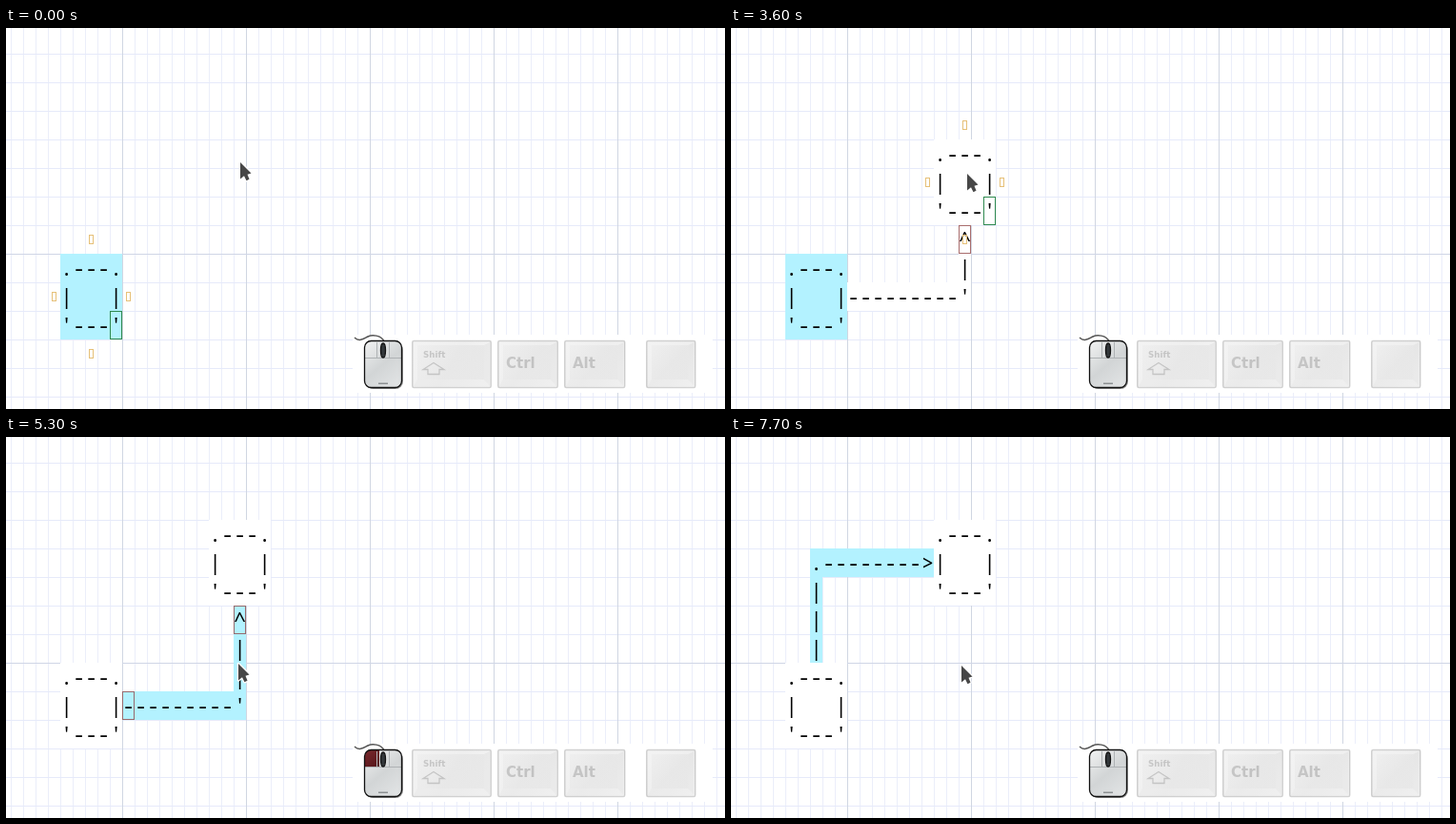
Animation, 755 px wide and 400 px high, one loop 8000 ms. Source, as an HTML page with a canvas:

```html
<!DOCTYPE html>
<html lang="en">
<head>
<meta charset="utf-8">
<title>Connected ASCII boxes</title>
<style>
html, body { margin: 0; width: 100%; height: 100%; overflow: hidden; background: #fff; }
canvas { display: block; }
</style>
</head>
<body>
<canvas id="stage" width="755" height="400"></canvas>
<script>
const ctx = document.getElementById('stage').getContext('2d');
const LOOP = 8000, CW = 13, CH = 30, BLUE = '#b3f2ff';
const ANCHOR = 'rgba(140,60,60,.75)';

// Pointer tip: [time, x, y], held until the next entry
const POINTER = [
  [0, 246, 141], [200, 241, 141], [300, 234, 141], [400, 228, 141], [500, 225, 141],
  [3400, 231, 144], [3500, 241, 150], [3600, 248, 153],
  [3800, 248, 150], [3900, 248, 140], [4000, 248, 126], [4100, 248, 120], [4200, 248, 118],
  [4500, 247, 150], [4600, 245, 215], [4700, 244, 238],
  [5900, 242, 236], [7700, 242, 240]
];

const between = (t, a, b) => t >= a && t < b;

function rect(x, y, w, h, fill) {
  ctx.fillStyle = fill;
  ctx.fillRect(x, y, w, h);
}

function path(d, fill, stroke, width = 1) {
  const p = new Path2D(d);
  if (fill) { ctx.fillStyle = fill; ctx.fill(p); }
  if (stroke) { ctx.strokeStyle = stroke; ctx.lineWidth = width; ctx.stroke(p); }
}

function gradient(x0, y0, x1, y1, ...colors) {
  const g = ctx.createLinearGradient(x0, y0, x1, y1);
  colors.forEach((c, i) => g.addColorStop(i / (colors.length - 1), c));
  return g;
}

function grid() {
  rect(0, 0, 755, 400, '#fff');
  for (let x = 5; x < 755; x += CW) rect(x, 0, 1, 400, '#ebeefa');
  for (let y = 27; y < 400; y += CH) rect(0, y, 755, 1, '#e6eafa');
  for (let x = 122; x < 755; x += CW * 10) rect(x, 0, 1, 400, '#d0d6e2');
  rect(0, 237, 755, 1, '#d0d6e6');
}

// Character cells from (x, y), one string per row
function cells(x, y, rows, bg) {
  ctx.font = '22px "Noto Sans Mono", monospace';
  ctx.textAlign = 'center';
  rows.forEach((row, r) => {
    rect(x, y + r * CH, row.length * CW, CH, bg);
    ctx.fillStyle = '#000';
    [...row].forEach((ch, c) => ctx.fillText(ch, x + (c + .5) * CW, y + r * CH + 23));
  });
}

function outline(x, y, color) {
  ctx.strokeStyle = color;
  ctx.lineWidth = 1;
  ctx.strokeRect(x + .5, y + .5, CW - 1, CH - 1);
}

const box = (x, y, bg) => cells(x, y, [".---.", "|   |", "'---'"], bg);

function handles(x, y) {
  ctx.strokeStyle = '#e6c078';
  ctx.lineWidth = 1;
  for (const [dx, dy] of [[32, -15], [32, 105], [-7, 45], [71, 45]])
    ctx.strokeRect(x + dx - 1.5, y + dy - 4.5, 4, 9);
}

function diagram(t) {
  const cloned = t >= 2800, grabbed = t >= 3800, wired = t >= 5300, flipped = t >= 7000;
  const top = t >= 4000 ? 87 : 117;

  box(57, 237, grabbed ? '#fff' : BLUE);
  if (!cloned) {
    outline(109, 297, '#2f8a50');
    handles(57, 237);
    return;
  }
  box(213, top, grabbed && !wired ? BLUE : '#fff');

  const bg = wired ? BLUE : '#fff';
  if (flipped) {
    cells(83, 117, ['.-------->', '|', '|', '|'], bg);
  } else {
    const tip = top + 90, bars = (267 - tip) / CH - 1;
    cells(239, tip, ['^', ...Array(bars).fill('|')], bg);
    cells(122, 267, ["---------'"], bg);
    outline(239, tip, ANCHOR);
    if (wired) outline(122, 267, ANCHOR);
  }
  if (!grabbed) outline(265, 177, '#2f8a50');
  if (!wired) handles(213, top);
}

function pointer(t) {
  const [, x, y] = POINTER.findLast(k => k[0] <= t);
  ctx.save();
  ctx.translate(x, y);
  ctx.lineJoin = 'round';
  const d = 'M0 0 L11.5 11.5 L7.5 12.8 L9.5 17.8 L6.5 19.3 L4 14.3 L0 17.5 Z';
  path(d, null, '#fff', 2.5);
  path(d, '#474747');
  ctx.restore();
}

function label(text, x, y, size, align) {
  ctx.font = `bold ${size}px "DejaVu Sans", sans-serif`;
  ctx.textAlign = align;
  ctx.fillStyle = '#000';
  ctx.fillText(text, x, y);
}

function key(x, w, on, draw) {
  ctx.save();
  ctx.globalAlpha = on ? 1 : .16;
  const y = 328.5, h = 49;
  ctx.beginPath();
  ctx.roundRect(x + .5, y, w - 1, h, 1.5);
  ctx.fillStyle = gradient(x, y, x + w, y + h, '#b8b8b8', '#999', '#c4c4c4');
  ctx.fill();
  rect(x + 6, 333, w - 14, 36, gradient(x, 333, x + w, 369, '#dedede', '#c4c4c4', '#a8a8a8'));
  path(`M${x + 6} 369 H${x + w - 8} L${x + w - 2} 376 H${x + 2} Z`, '#d0d0d0');
  path(`M${x + w - 8} 333 V369 L${x + w - 2} 376 V330 Z`, '#bcbcbc');
  ctx.strokeStyle = '#000';
  ctx.lineWidth = 1.5;
  ctx.beginPath();
  ctx.roundRect(x + .75, y, w - 1.5, h, 1.5);
  ctx.stroke();
  draw();
  ctx.restore();
}

function mouse(pressed) {
  path('M366 325 C371 330 376 326 380 324 S394 322 397 329', null, '#555', 1.5);
  ctx.beginPath();
  ctx.roundRect(377.5, 330, 39.5, 49, 8);
  ctx.fillStyle = 'rgba(0,0,0,.45)';
  ctx.fill();
  ctx.save();
  ctx.beginPath();
  ctx.roundRect(376.5, 328.5, 39, 49, 7);
  ctx.fillStyle = gradient(376, 328, 416, 378, '#f2f3f3', '#d2d5d6', '#e4e6e7');
  ctx.fill();
  ctx.clip();
  if (pressed) rect(377, 329, 15, 17, gradient(377, 329, 392, 346, '#7a2a2e', '#541418'));
  path('M377 346.5 H415 M389.5 346 V330 M402.5 346 V330', null, '#aeb2b4');
  ctx.restore();
  ctx.strokeStyle = '#111';
  ctx.lineWidth = 1.3;
  ctx.beginPath();
  ctx.roundRect(376.5, 328.5, 39, 49, 7);
  ctx.stroke();
  ctx.beginPath();
  ctx.ellipse(396, 338.5, 2.5, 7.5, 0, 0, Math.PI * 2);
  ctx.fillStyle = '#33383b';
  ctx.fill();
  ctx.stroke();
  rect(391, 372.5, 10, 1.5, '#8d9193');
}

function keyboard(t) {
  rect(364, 322, 378, 61, '#fff');
  mouse(between(t, 2800, 3100) || between(t, 3800, 4500) || between(t, 5300, 5600));
  key(426, 84, false, () => {
    label('Shift', 438, 346, 8.7, 'left');
    path('M449 351.5 L460 358.5 H455 V363.5 H443 V358.5 H438 Z', null, '#000', 1.3);
  });
  key(516, 64, false, () => label('Ctrl', 525, 357, 15, 'left'));
  key(586, 64.5, between(t, 2400, 3400), () => label('Alt', 595, 357, 15, 'left'));
  const typed = between(t, 6500, 7600);
  key(672, 52.5, typed, () => {
    if (typed) label(t < 7000 ? 'A' : 'D', 698, 360, 22, 'center');
  });
}

function frame(now) {
  const t = now % LOOP;
  grid();
  diagram(t);
  pointer(t);
  keyboard(t);
  requestAnimationFrame(frame);
}
requestAnimationFrame(frame);
</script>
</body>
</html>
```
